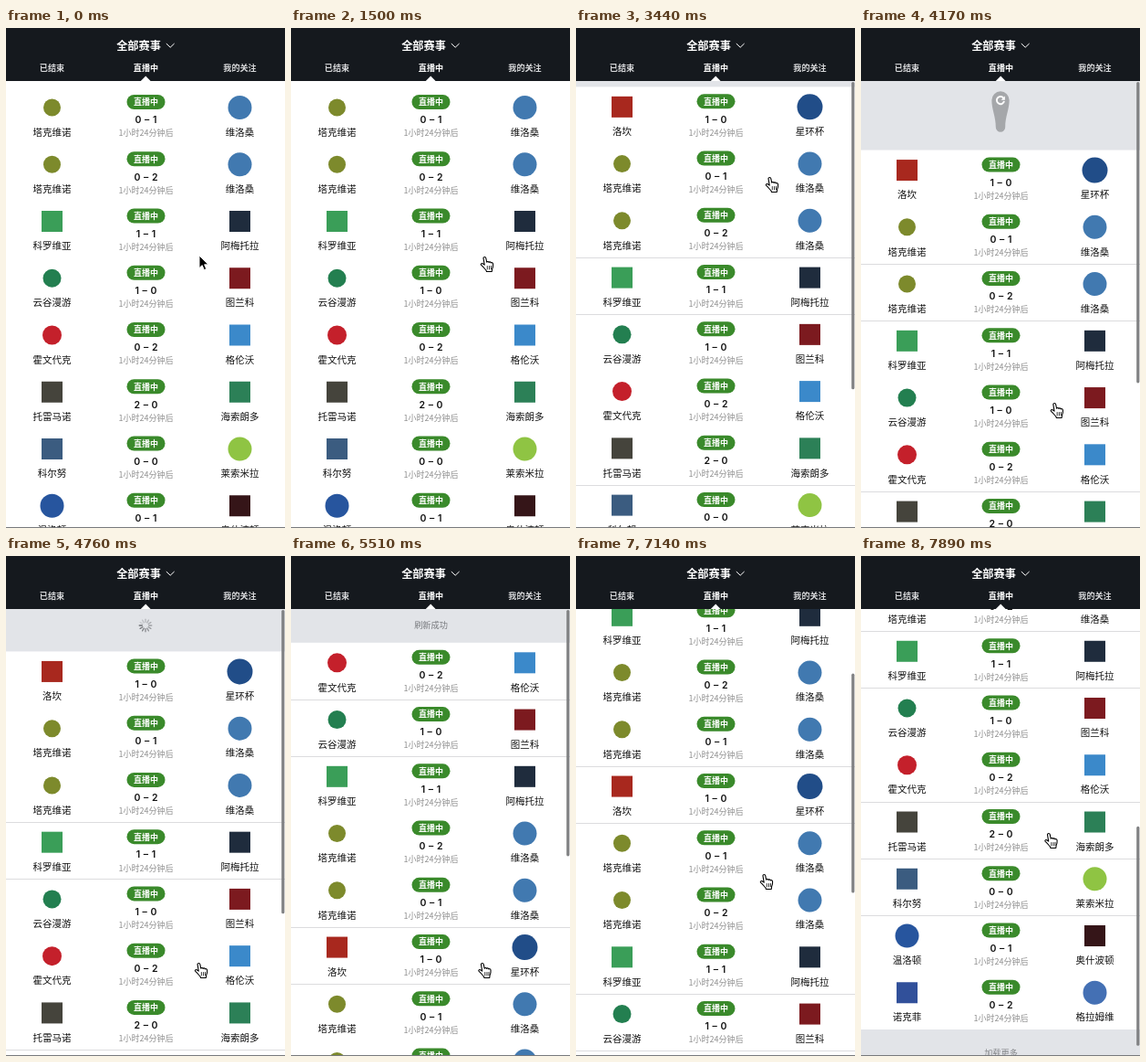
Write an HTML page that moves like this. It is 306 px wide and 547 px high and loops after 8 s.

```html
<!DOCTYPE html>
<html lang="zh-CN">
<head>
<meta charset="utf-8">
<title>直播赛事列表</title>
<style>
html, body { margin: 0; width: 100%; height: 100%; overflow: hidden; background: #fff; }
svg { display: block; width: 100vw; height: 100vh; }
text { font-family: "Noto Sans CJK SC", "Noto Sans CJK", "Noto Sans", sans-serif; text-anchor: middle; }
.score { font-family: Inter, Roboto, sans-serif; font-weight: 600; word-spacing: 1px; }
.bold { font-weight: 700; }
</style>
</head>
<body>
<svg id="stage" viewBox="0 0 306 547" preserveAspectRatio="none"></svg>
<script>
const LOOP = 8000, STEP = 148, STEP_PHASE = 24;
const HOVER = 1500, TOUCH = 2540, LOADING = 4460, RELOAD = 5510;
const TOP = 58, PITCH = 62.25, MID = 153.5, BAND = '#e2e4e8';
const stage = document.getElementById('stage');

function el(parent, tag, attrs = {}, content) {
  const node = document.createElementNS('http://www.w3.org/2000/svg', tag);
  for (const key in attrs) node.setAttribute(key, attrs[key]);
  if (content) node.textContent = content;
  parent.appendChild(node);
  return node;
}

// Text centred on (x, y)
function label(parent, x, y, size, fill, content, cls = '') {
  return el(parent, 'text', { x, y: y + size * 0.38, 'font-size': size, fill, class: cls }, content);
}

const show = (node, on) => node.setAttribute('display', on ? 'inline' : 'none');
const move = (node, x, y) => node.setAttribute('transform', `translate(${x} ${y})`);

const square = (name, color, size = 23) => ({ name, color, size, round: false });
const circle = (name, color, size = 26) => ({ name, color, size, round: true });
const winger = circle('塔克维诺', '#7d8a2c', 19), coast = circle('维洛桑', '#4179b0');
const games = [
  [square('洛坎', '#a8281e'), '1 – 0', circle('星环杯', '#214d88', 28)],
  [winger, '0 – 1', coast],
  [winger, '0 – 2', coast],
  [square('科罗维亚', '#3a9e58'), '1 – 1', square('阿梅托拉', '#1f2c3d')],
  [circle('云谷漫游', '#237f50', 20), '1 – 0', square('图兰科', '#7c1a1f')],
  [circle('霍文代克', '#c4202b', 21), '0 – 2', square('格伦沃', '#3b89ca')],
  [square('托雷马诺', '#45443c'), '2 – 0', square('海索朗多', '#2c8057')],
  [square('科尔努', '#3b5c80'), '0 – 0', circle('莱索米拉', '#8fc443')],
  [circle('温洛顿', '#27559e'), '0 – 1', square('奥什波顿', '#351518')],
  [square('诺克菲', '#31509a'), '0 – 2', circle('格拉姆维', '#4470b4')]
];

function drawTeam(row, x, { name, color, size, round }) {
  const r = size / 2;
  el(row, 'rect', { x: x - r, y: 22 - r, width: size, height: size, rx: round ? r : 0, fill: color });
  label(row, x, 48.7, 10.5, '#111', name);
}

function makeList(rows) {
  const root = el(stage, 'g'), body = el(root, 'g');
  const end = rows.length * PITCH;
  el(body, 'rect', { width: 306, height: end, fill: '#fff' });
  el(body, 'rect', { y: end, width: 306, height: 300, fill: BAND });
  label(body, MID, end + 25, 9.2, '#85878a', '加载更多');
  rows.forEach(([home, score, away], i) => {
    const row = el(body, 'g');
    move(row, 0, i * PITCH);
    drawTeam(row, 50.5, home);
    drawTeam(row, 256.5, away);
    el(row, 'rect', { x: 132.5, y: 8, width: 42, height: 16, rx: 8, fill: '#3a8a2b' });
    label(row, MID, 16, 9, '#fff', '直播中', 'bold');
    label(row, MID, 35.3, 10.5, '#111', score, 'score');
    label(row, MID, 50, 9, '#8f8f8f', '1小时24分钟后');
  });
  const lines = rows.slice(1).map(() => el(root, 'rect', { width: 306, height: 1, fill: '#dcdcde' }));
  return { root, body, lines };
}

function drawList(list, top, ruled) {
  move(list.body, 0, top);
  list.lines.forEach((line, i) => {
    // Hairlines only survive on part of each pixel
    const y = top + (i + 1) * PITCH, snapped = Math.floor(y);
    show(line, ruled && y - snapped < 0.55);
    line.setAttribute('y', snapped);
  });
}

// Pull-down area
el(stage, 'rect', { y: TOP, width: 306, height: 489, fill: BAND });
const drop = el(stage, 'g');
const dropShape = el(drop, 'path', { fill: '#a5a7aa' });
const dropIcon = el(drop, 'g');
el(dropIcon, 'path', { d: 'M3.3 -2.4A4.1 4.1 0 1 0 4 1', fill: 'none', stroke: '#fff', 'stroke-width': 1.9 });
el(dropIcon, 'path', { d: 'M4.9 -4.6V-.2H.7Z', fill: '#fff' });

const spinner = el(stage, 'g');
const spokes = Array.from({ length: 12 }, (_, i) => el(spinner, 'line', {
  y1: -3.6, y2: -6.8, stroke: '#707276', 'stroke-width': 1.3, 'stroke-linecap': 'round',
  transform: `translate(153 76) rotate(${i * 30})`
}));
const done = label(stage, MID, 76, 9.2, '#77797d', '刷新成功');

const before = makeList(games);
const after = makeList([...games.slice(1, 6).reverse(), ...games]);

const bar = el(stage, 'rect', { x: 302.2, width: 3.2, rx: 1.6, fill: '#808183' });

// Header
el(stage, 'rect', { width: 306, height: TOP, fill: '#15191e' });
label(stage, 145.5, 19, 12.2, '#fff', '全部赛事', 'bold');
el(stage, 'path', { d: 'M175.8 17L180.2 21.2L184.6 17', fill: 'none', stroke: '#fff' });
['已结束', '直播中', '我的关注'].forEach((tab, i) =>
  label(stage, 50.5 + i * 103, 44, 9.1, i === 1 ? '#fff' : '#d8d9db', tab, 'bold'));
el(stage, 'path', { d: 'M147.8 58L153.2 52.4L158.6 58Z', fill: '#fff' });
el(stage, 'rect', { y: 546, width: 306, height: 1, fill: '#77797c' });

// Pointers
const arrow = el(stage, 'path', {
  d: 'M0 0V13.5L3.2 10.6L5.3 15.6L7.7 14.6L5.6 9.8H9.8Z',
  fill: '#000', stroke: '#fff', 'stroke-width': 0.9, transform: 'translate(212 249)'
});
const hand = el(stage, 'g', { stroke: '#000', 'stroke-linecap': 'round', 'stroke-linejoin': 'round' });
el(hand, 'path', {
  d: 'M3.5 1.8c0-1.7 2.6-1.7 2.8 0l.9 4.4c.4-1 2-.9 2.3.2.6-.9 2-.6 2.3.5.8-.6 2.2-.2 2.3 1.3' +
     '.2 2.4-.1 3.9-1 5.6l-.3 2.7H7l-.6-1.6C5 13.6 3.6 11.4 1.2 9.4c-1-.9.1-2.3 1.5-1.7l2 1.4z',
  fill: '#fff', 'stroke-width': 1.1
});
el(hand, 'path', { d: 'M7.8 10.5v3.4M10 10.5v3.4M12 10.4v3.3', fill: 'none', 'stroke-width': 0.8 });

// Motion
const linear = x => x;
const easeIn = x => x * x;
const easeOut = x => 1 - (1 - x) * (1 - x);
const smooth = x => x * x * (3 - 2 * x);
const progress = (t, from, to) => Math.min(1, Math.max(0, (t - from) / (to - from)));

// Runs moves of the form [from, to, goal, ease] one after another
const follow = (value, moves, t) => moves.reduce(
  (v, [from, to, goal, ease]) => v + (goal - v) * ease(progress(t, from, to)), value);

const listMoves = [
  [2390, 2840, TOP, easeOut],
  [3360, 4168, 133.57, linear],
  [4168, 4316, 145, easeOut],
  [4400, 4900, 94.82, smooth],
  [5960, 6410, TOP, smooth],
  [6410, 7128, -81.18, easeIn],
  [7128, 7868, -415.73, easeOut]
];
const handMoves = [
  [1700, 1948, 216, smooth],
  [2390, 2840, 300, easeOut],
  [2900, 3280, 152, smooth],
  [3280, 3428, 163, linear],
  [3428, 4168, 410, linear],
  [4168, 4460, 445, easeOut],
  [6200, 7128, 348, easeIn],
  [7128, 7868, 303, easeOut]
];

function drawDrop(top) {
  const tail = Math.max(0, top - TOP - 46);
  const r = 12 - tail * 0.08, tip = 12 - tail * 0.23;
  const y = Math.min(79, top - 25), low = y + tail;
  const waist = y + tail * 0.35, neck = low - tail * 0.4;
  dropShape.setAttribute('d',
    `M${153 - r} ${y}A${r} ${r} 0 0 1 ${153 + r} ${y}` +
    `C${153 + r} ${waist} ${153 + tip} ${neck} ${153 + tip} ${low}` +
    `A${tip} ${tip} 0 0 1 ${153 - tip} ${low}` +
    `C${153 - tip} ${neck} ${153 - r} ${waist} ${153 - r} ${y}Z`);
  move(dropIcon, 153, y);
}

function render(time) {
  // The screen refreshes in even steps
  const t = Math.floor((time - STEP_PHASE) / STEP) * STEP + STEP_PHASE;
  const top = follow(2.75, listMoves, t);
  const touched = time >= TOUCH, reloaded = time >= RELOAD;

  show(before.root, !reloaded);
  show(after.root, reloaded);
  drawList(reloaded ? after : before, top, touched);

  show(drop, time < LOADING);
  drawDrop(top);
  show(spinner, time >= LOADING && !reloaded);
  const lead = Math.floor(t / 83);
  spokes.forEach((spoke, i) => spoke.setAttribute('opacity', 1 - ((lead - i + 12) % 12) * 0.07));
  show(done, reloaded);

  const pulled = Math.max(0, top - TOP), scrolled = Math.max(0, TOP - top);
  show(bar, touched);
  bar.setAttribute('y', TOP + 1 + scrolled / 2);
  bar.setAttribute('height', reloaded ? 240 + pulled * 0.8 : 337 - pulled * 0.1);

  show(arrow, time < HOVER);
  show(hand, time >= HOVER);
  move(hand, 207.5 - 6.5 * smooth(progress(t, 3800, 7800)), follow(250, handMoves, t));
}

const started = performance.now();
function loop() {
  render((performance.now() - started) % LOOP);
  requestAnimationFrame(loop);
}
loop();
</script>
</body>
</html>
```
